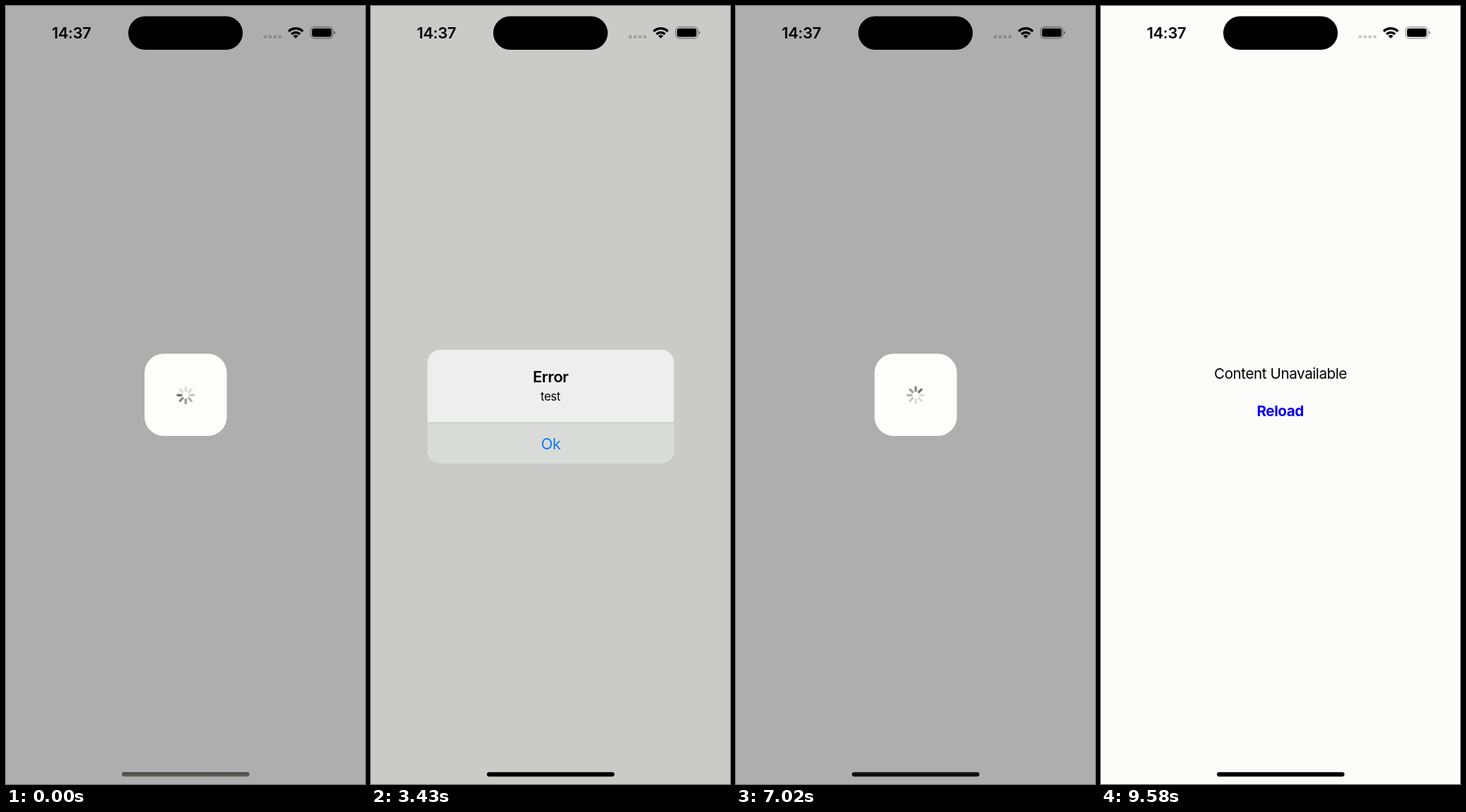
Write an HTML page that moves like this. It is 508 px wide and 1102 px high and loops after 9680 ms.

```html
<!DOCTYPE html>
<html lang="en">
<head>
<meta charset="utf-8">
<title>Loading, error, reload</title>
<style>
  html, body { margin: 0; width: 100%; height: 100%; overflow: hidden; background: #fcfcfb; }
  svg { display: block; width: 100vw; height: 100vh; }
  text { font-family: Inter, "Open Sans", sans-serif; text-anchor: middle; letter-spacing: -.02em; }
</style>
</head>
<body>
<svg viewBox="0 0 508 1102">
  <defs>
    <linearGradient id="faded" x2="0" y2="1">
      <stop stop-color="#454542"/><stop offset="1" stop-color="#64645f"/>
    </linearGradient>
    <clipPath id="card"><rect x="80" y="487" width="348.5" height="160.5" rx="18"/></clipPath>
  </defs>
  <rect width="508" height="1102" fill="#fcfcfb"/>

  <g id="content">
    <text x="254" y="527.5" font-size="20.6">Content Unavailable</text>
    <text id="reload" x="253.7" y="581" font-size="20.6" font-weight="700" fill="#0a00f0">Reload</text>
  </g>

  <g id="loading">
    <rect width="508" height="1102" fill="#aeaeae"/>
    <rect x="196" y="492.5" width="116.5" height="116.5" rx="27" fill="#fdfdfc"/>
    <g id="spinner" transform="translate(254.3 551.2)" stroke="#000" stroke-width="3.4" stroke-linecap="round"/>
  </g>

  <rect id="dim" width="508" height="1102" opacity="0"/>
  <g id="alert">
    <g clip-path="url(#card)">
      <rect x="80" y="487" width="349" height="161" fill="#eeeeee"/>
      <rect id="pressed" x="80" y="590" width="349" height="58" fill="#d9dbd9"/>
      <path d="M80 590.3H429" stroke="#bdbdbf"/>
    </g>
    <text x="254.2" y="533" font-size="22" font-weight="600">Error</text>
    <text x="254" y="559" font-size="16.6">test</text>
    <text x="254.5" y="627.5" font-size="22" fill="#147cf0">Ok</text>
  </g>

  <text x="92.5" y="46" font-size="22" font-weight="600">14:37</text>
  <rect x="173" y="14.5" width="162" height="47.5" rx="23.75"/>
  <g id="signal" opacity=".2"></g>
  <g id="wifi" fill="none" stroke="#000"></g>
  <rect x="431.1" y="29.6" width="31.4" height="16.2" rx="5" fill="none" stroke="#000" stroke-opacity=".42" stroke-width="1.2"/>
  <rect x="433" y="31.7" width="27.6" height="12" rx="3.2"/>
  <path d="M464 35.2q2 .7 2 2.5t-2 2.5z" opacity=".45"/>
  <rect id="homeBar" x="164" y="1085.2" width="180.5" height="6.3" rx="3.15"/>
</svg>
<script>
const LOOP = 9680, SPOKE_MS = 100;
const $ = id => document.getElementById(id);
const add = (parent, tag, attrs) => {
  const el = document.createElementNS("http://www.w3.org/2000/svg", tag);
  set(el, attrs);
  return parent.appendChild(el);
};
function set(el, attrs) {
  for (const key in attrs) el.setAttribute(key, attrs[key]);
}
const clamp = v => Math.min(1, Math.max(0, v));

// Critically damped spring from 0 to 1, time in ms.
const spring = ms => {
  const x = Math.max(0, ms) * 0.02285;
  return 1 - (1 + x) * Math.exp(-x);
};

for (let i = 0; i < 4; i++)
  add($("signal"), "rect", { x: 364.6 + i * 6.9, y: 41.4, width: 4.5, height: 4.4, rx: 1.3 });

for (const [radius, width] of [[2.5, 5], [8.5, 3.4], [14.2, 3.4]]) {
  const d = radius * Math.SQRT1_2;
  add($("wifi"), "path", {
    d: `M${410 - d} ${46 - d}A${radius} ${radius} 0 0 1 ${410 + d} ${46 - d}`,
    "stroke-width": width
  });
}

const spokes = Array.from({ length: 8 }, (_, i) =>
  add($("spinner"), "path", { d: "M0-6.2V-11.3", transform: `rotate(${i * 45})` }));

const cycles = [
  { load: 0, alert: 2435, press: 3430, dismiss: 3525, head: 6.1, bar: "url(#faded)" },
  { load: 4340, alert: 8115, press: 9020, dismiss: 9115, head: 6.3, bar: "#111" }
];
const RELOAD_PRESS = 4250;

function spokeOpacity(age) {
  if (age > 7.3) return 0.13 + 0.42 * (age - 7.3) / 0.7;
  return 0.13 + 0.42 * Math.max(0, 1 - age / 5);
}

function draw(t) {
  const cycle = cycles[t < cycles[1].load ? 0 : 1];
  const loading = t < cycle.alert;
  const isPressed = t >= RELOAD_PRESS && t < cycles[1].load;
  const idle = t >= RELOAD_PRESS && isPressed;

  $("loading").style.display = loading ? "" : "none";
  set($("homeBar"), { fill: loading ? cycle.bar : "#000" });
  const restored = clamp((t - cycle.alert) / 200);
  set($("reload"), { opacity: idle ? 0.21 : 0.2 + 0.8 * restored });

  const head = cycle.head + (t - cycle.load) / SPOKE_MS;
  spokes.forEach((spoke, i) =>
    set(spoke, { "stroke-opacity": spokeOpacity((((head - i) % 8) + 8) % 8) }));

  const shown = spring(t - cycle.alert);
  const visible = loading ? 0 : shown * (1 - spring(t - cycle.dismiss));
  const scale = 1.2 - 0.2 * shown;
  set($("dim"), { opacity: 0.2 * visible });
  set($("alert"), {
    opacity: visible,
    transform: `translate(254.25 567.25) scale(${scale}) translate(-254.25 -567.25)`
  });
  set($("pressed"), { opacity: t >= cycle.press ? 1 : 0 });
}

const start = performance.now();
function tick() {
  draw((performance.now() - start) % LOOP);
  requestAnimationFrame(tick);
}
tick();
</script>
</body>
</html>
```
